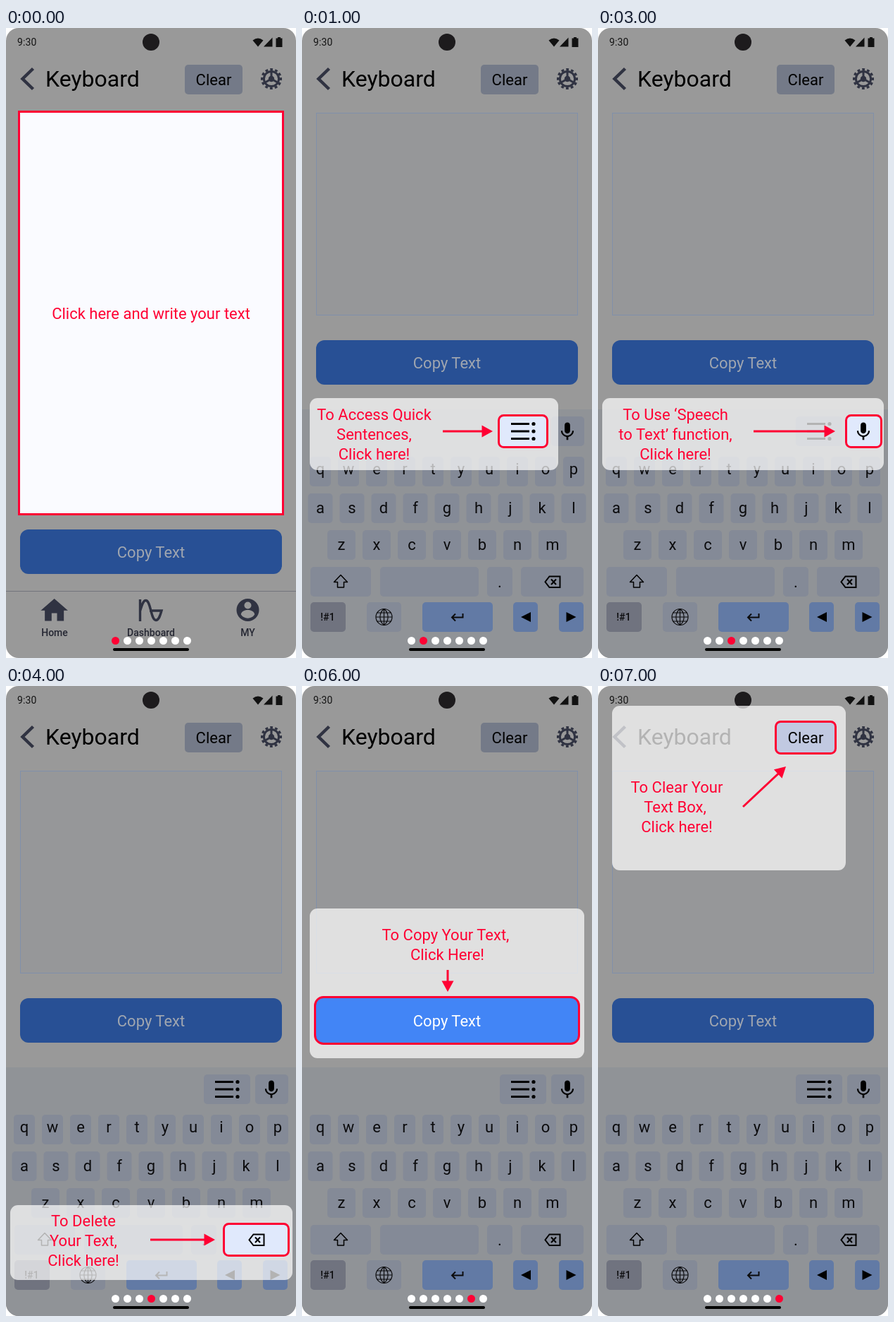
An HTML page that plays this animation: 412 px wide and 892 px high, repeating every 8000 ms.

```html
<!DOCTYPE html>
<html lang="en">
<head>
<meta charset="utf-8">
<title>Keyboard tutorial</title>
<style>
html, body { margin: 0; width: 100%; height: 100%; overflow: hidden; background: #fff; }
svg { display: block; width: 100%; height: 100%; }
text { font-family: Roboto, sans-serif; font-size: 22px; }
</style>
</head>
<body>
<svg id="stage" viewBox="0 0 412 892" xmlns="http://www.w3.org/2000/svg"></svg>
<script>
const stage = document.getElementById('stage');
const STEP = 1000, COUNT = 8;
const RED = '#ff0033', SLATE = '#303342', KEY = '#848a97', BLUE_KEY = '#627aa5', LIT = '#e0e9fc';

const rect = (x, y, w, h, fill, r = 0, extra = '') =>
  `<rect x="${x}" y="${y}" width="${w}" height="${h}" rx="${r}" fill="${fill}" ${extra}/>`;
const circle = (x, y, r, fill, extra = '') =>
  `<circle cx="${x}" cy="${y}" r="${r}" fill="${fill}" ${extra}/>`;
const path = (d, fill, extra = '') => `<path d="${d}" fill="${fill}" ${extra}/>`;
const line = (d, color, width, extra = '') =>
  path(d, 'none', `stroke="${color}" stroke-width="${width}" ${extra}`);
const text = (s, x, y, fill, extra = 'text-anchor="middle"') =>
  `<text x="${x}" y="${y}" fill="${fill}" ${extra}>${s}</text>`;

// Key boxes: x, y, width, height
const box = {
  list: [281, 550, 66, 42], mic: [354, 550, 47, 42],
  shift: [12, 763, 86, 42], back: [311, 763, 89, 42],
  clear: [254, 52, 82, 42], copy: [20, 442, 372, 63]
};

const icon = {
  list: () => [560.5, 571, 581.5].map(y =>
    line(`M297 ${y}H323`, '#000', 3) + circle(329, y, 2.6, '#000')).join(''),
  mic: () => path('M12 14c1.7 0 3-1.3 3-3V5c0-1.7-1.3-3-3-3S9 3.300 9 5v6c0 1.700 1.300 3 3 3zM17.300 11c0 3-2.500 5.100-5.300 5.100S6.700 14 6.700 11H5c0 3.400 2.700 6.200 6 6.700V21h2v-3.300c3.300-.5 6-3.300 6-6.700z',
    '#000', 'transform="translate(361.400 556) scale(1.3)"'),
  shift: () => line('M55 774.500L64.500 784.500H59.500V792H50.500V784.500H45.500Z', '#000', 1.5, 'stroke-linejoin="round"'),
  back: () => line('M351.500 776.500H366.500V792H351.500L345.500 784.250Z', '#000', 2) +
    line('M354 780.500l7 7.500m0-7.500l-7 7.500', '#000', 2),
  clear: () => text('Clear', 295, 81, '#000'),
  copy: () => text('Copy Text', 206, 482, '#fff')
};

const key = (name, fill = KEY, r = 5) => rect(...box[name], fill, r) + icon[name]();

function ring(name, fill = LIT, r = 7) {
  const [x, y, w, h] = box[name];
  return rect(x - 1.5, y - 1.5, w + 3, h + 3, fill, r, `stroke="${RED}" stroke-width="3"`) + icon[name]();
}

function arrow(x1, y1, x2, y2) {
  const len = Math.hypot(x2 - x1, y2 - y1);
  const deg = Math.atan2(y2 - y1, x2 - x1) * 180 / Math.PI;
  return `<g transform="translate(${x1} ${y1}) rotate(${deg})">` +
    line(`M0 0H${len - 12}`, RED, 3) +
    path(`M${len} 0l-15.500 -8.500v17z`, RED) + '</g>';
}

const caption = (lines, x, y) => lines.map((s, i) => text(s, x, y + 28 * i, RED)).join('');
const veil = (x, y, w, h) => rect(x, y, w, h, '#fff', 11, 'fill-opacity=".7"');

function gear() {
  const at = 'transform="translate(377 72)"';
  const ringLine = (r, w, extra = '') =>
    circle(0, 0, r, 'none', `stroke="${SLATE}" stroke-width="${w}" ${extra}`);
  const spokes = [-90, 30, 150].map(a =>
    `<g transform="rotate(${a})">${line('M0 0H10', SLATE, 3)}</g>`).join('');
  return `<g ${at}>` + ringLine(13.4, 3.2, 'pathLength="24" stroke-dasharray="1.100 .9" stroke-dashoffset=".5"') +
    ringLine(10.6, 3) + circle(0, 0, 4.2, SLATE) + spokes + '</g>';
}

function header(title, clear) {
  return text('9:30', 16, 25, '#151515', 'style="font-size:14px" letter-spacing=".14"') +
    circle(206, 20, 12, '#1d1b1d') +
    path('M358 26.500L350.500 17.500Q358 11.500 365.500 17.500Z', '#111') +
    path('M378.500 13.500V26.500H366Z', '#111') +
    path('M386 13h4v1.500h2.500V27h-9V14.500h2.500z', '#111') +
    line('M38.500 57.500L23.500 72L38.500 86.500', SLATE, 4.5) +
    text(title, 56, 83, '#000', 'style="font-size:32px"') +
    (clear ? key('clear', '#747a88') : '') + gear();
}

function form(boxHeight, buttonY) {
  return rect(20.5, 120.5, 371, boxHeight, '#969799', 0, 'stroke="#8090aa" stroke-width="1"') +
    rect(20, buttonY, 372, 63, '#285095', 12) +
    text('Copy Text', 206, buttonY + 40, '#a0a6b0');
}

function tabs() {
  const label = (s, x) => text(s, x, 861, '#252733', 'text-anchor="middle" style="font-size:14px;font-weight:500"');
  return line('M0 797.500H412', '#73757c', 1) +
    path('M10 20v-6h4v6h5v-8h3L12 3 2 12h3v8z', SLATE, 'transform="translate(45.500 802.500) scale(1.93 1.850)"') +
    line('M190.500 809V840M190.500 825.500C193 817 195 810.500 198.500 810.500C206 810.500 205.500 838.500 213 838.500C217 838.500 219 832 221 825H204', SLATE, 3.4) +
    circle(343.5, 824, 16, SLATE) + circle(343.5, 817.5, 5, '#999') +
    path('M333.800 830.500C334 825.500 340 824 343.500 824S353 825.500 353.200 830.500A11.600 11.600 0 0 1 333.800 830.500Z', '#999') +
    label('Home', 69) + label('Dashboard', 206) + label('MY', 343.5);
}

function keyRow(letters, first, step, width, y) {
  return [...letters].map((c, i) => {
    const x = first + step * i;
    return rect(x - width / 2, y, width, 42, KEY, 5) + text(c, x, y + 25 + (y > 607 ? 3 : 0), '#0b0b0d');
  }).join('');
}

function keyboard() {
  return rect(0, 540, 412, 352, '#909397') +
    key('list') + key('mic') +
    keyRow('qwertyuiop', 26, 40, 30, 607) +
    keyRow('asdfghjkl', 26, 45, 35, 659) +
    keyRow('zxcvbnm', 56, 50, 40, 711) +
    key('shift') + rect(111, 763, 140, 42, KEY, 5) +
    rect(263, 763, 36, 42, KEY, 5) + text('.', 281, 792, '#0b0b0d') + key('back') +
    rect(12, 813, 50, 42, '#70737f', 5) +
    text('!#1', 36.5, 839, '#0b0b0d', 'text-anchor="middle" style="font-size:14px;font-weight:500"') +
    rect(92, 813, 49, 42, KEY, 5) +
    line('M105 834a11.500 11.500 0 1 0 23 0a11.500 11.500 0 1 0-23 0H128M116.500 822.500V845.500M116.500 822.500c-7.500 6-7.500 17 0 23c7.500-6 7.500-17 0-23M107 828H126M107 840H126', '#0b0b0d', 1.2) +
    rect(171, 813, 100, 42, BLUE_KEY, 5) +
    line('M228.500 829V834.500H214M218 829.500L213 834.500L218 839.500', '#0b0b0d', 2) +
    rect(300, 813, 35, 42, BLUE_KEY, 5) + path('M311 834l14-7v14z', '#000') +
    rect(365, 813, 35, 42, BLUE_KEY, 5) + path('M389.500 834l-14-7v14z', '#000');
}

const typing = () => header('Keyboard', true) + form(286, 442) + keyboard();

const scenes = [
  [0, () => header('Keyboard', true) + form(566, 710) + tabs() +
    rect(18.5, 118.5, 375, 570, '#fafbff', 0, `stroke="${RED}" stroke-width="3"`) +
    text('Click here and write your text', 206, 412, RED)],
  [1, () => typing() + veil(11, 524, 353, 102) +
    caption(['To Access Quick', 'Sentences,', 'Click here!'], 102.5, 555) +
    arrow(200, 571, 271, 571) + ring('list')],
  [1, () => header('Quick Sentences', false) + form(566, 710) + tabs()],
  [2, () => typing() + veil(6, 524, 400, 102) +
    caption(['To Use ‘Speech', 'to Text’ function,', 'Click here!'], 110, 555) +
    arrow(221, 571, 337, 571) + ring('mic')],
  [3, () => typing() + veil(6, 735, 401, 106) +
    caption(['To Delete', 'Your Text,', 'Click here!'], 110, 765) +
    arrow(205, 784, 297, 784) + ring('back')],
  [4, () => typing() + veil(6, 735, 401, 106) +
    caption(['Click to capitalize.', 'Double-click to', 'continue capitalizing.'], 294.5, 765) +
    arrow(183, 784, 125, 785) + ring('shift')],
  [5, () => typing() + veil(11, 315, 390, 212) +
    text('To Copy Your Text,', 204, 360, RED) + text('Click Here!', 206.5, 388, RED) +
    arrow(207, 402, 207, 433) + ring('copy', '#4285f6', 12)],
  [6, () => typing() + veil(20, 28, 332, 233) +
    text('To Clear Your', 112, 151, RED) + text('Text Box,', 109.5, 179, RED) +
    text('Click here!', 112, 207, RED) +
    arrow(206, 171, 267, 114) + ring('clear', '#c1c9e1')]
];

function draw(n) {
  const [active, body] = scenes[n];
  const dots = Array.from({ length: 7 }, (_, i) =>
    circle(155.5 + 17 * i, 867.5, 5.5, i === active ? RED : '#fff')).join('');
  stage.innerHTML = '<clipPath id="screen"><rect width="412" height="892" rx="18"/></clipPath>' +
    '<g clip-path="url(#screen)">' + rect(0, 0, 412, 892, '#999') + body() +
    rect(152, 878, 108, 4, '#000', 2) + dots + '</g>';
}

const start = performance.now();
let shown = -1;
function tick() {
  const n = Math.floor((performance.now() - start) / STEP) % COUNT;
  if (n !== shown) draw(shown = n);
  requestAnimationFrame(tick);
}
tick();
</script>
</body>
</html>
```
